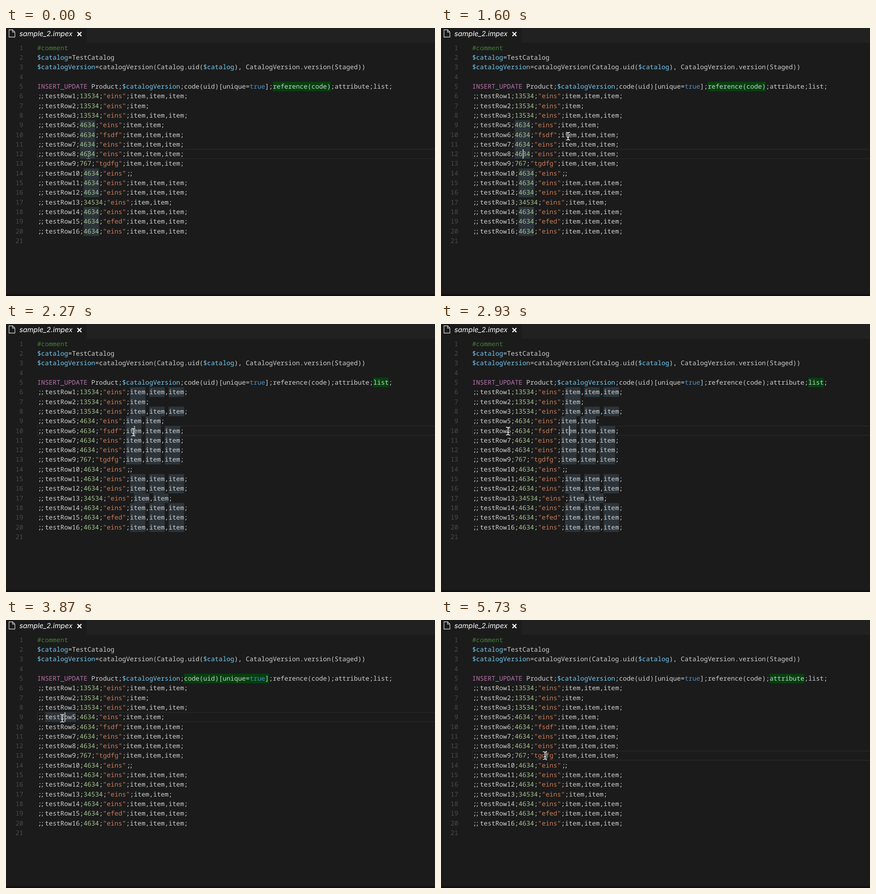
These frames come from a looping animation (947x592 px, 5.79 s). An HTML page:

```html
<!DOCTYPE html>
<html lang="en">
<head>
<meta charset="utf-8">
<title>Editor column highlight</title>
<style>
  html, body { margin: 0; width: 100%; height: 100%; overflow: hidden; background: #1b1b1b; }
  svg { display: block; width: 947px; height: 592px; }
  text { text-rendering: geometricPrecision; white-space: pre; }
  .code { font: 14.208px "Noto Sans Mono", "DejaVu Sans Mono", monospace; }
  .tab { font: italic 15.4px Inter, "Open Sans", sans-serif; fill: #fff; }
</style>
</head>
<body>
<svg id="stage" viewBox="0 0 947 592" xmlns="http://www.w3.org/2000/svg">
  <rect width="947" height="592" fill="#1b1b1b"/>
  <rect x="178" width="769" height="33" fill="#212121"/>
  <rect y="588" width="947" height="4" fill="#130d13"/>
  <path d="M6.6 4h8l5 5v11h-13zM14.4 4v5.2h5.2" fill="none" stroke="#cfcfcf" stroke-width="1.3"/>
  <text class="tab" x="29.5" y="18.3">sample_2.impex</text>
  <path d="M157.7 9l8.8 8.8m0-8.8l-8.8 8.8" stroke="#fff" stroke-width="2.4"/>
  <rect id="line" x="69.5" width="900" height="20.3" fill="none" stroke="#282828" stroke-width="1.4"/>
  <g id="marks"></g>
  <g id="code" class="code"></g>
  <rect id="caret" width="2" height="21.3" fill="#b4b5b3"/>
  <g id="mouse" fill="none" stroke-linecap="round">
    <path d="M-4 -8.5Q0 -8.5 0 -6Q0 -8.5 4 -8.5M0 -6V6M-4 8.5Q0 8.5 0 6Q0 8.5 4 8.5M-2 2.5H2" stroke="#1b1b1b" stroke-width="3.2"/>
    <path d="M-4 -8.5Q0 -8.5 0 -6Q0 -8.5 4 -8.5M0 -6V6M-4 8.5Q0 8.5 0 6Q0 8.5 4 8.5M-2 2.5H2" stroke="#f2f2f2" stroke-width="1.6"/>
  </g>
</svg>
<script>
const LOOP = 5790, LEFT = 69, TOP = 33.3, CHAR = 8.525, ROW = 21.3, BASELINE = 15.52;
const byId = id => document.getElementById(id);
const colX = col => LEFT + col * CHAR;
const rowY = line => TOP + (line - 1) * ROW;

const source = `#comment
$catalog=TestCatalog
$catalogVersion=catalogVersion(Catalog.uid($catalog), CatalogVersion.version(Staged))

INSERT_UPDATE Product;$catalogVersion;code(uid)[unique=true];reference(code);attribute;list;
;;testRow1;13534;"eins";item,item,item;
;;testRow2;13534;"eins";item;
;;testRow3;13534;"eins";item,item,item;
;;testRow5;4634;"eins";item,item;
;;testRow6;4634;"fsdf";item,item,item;
;;testRow7;4634;"eins";item,item,item;
;;testRow8;4634;"eins";item,item,item;
;;testRow9;767;"tgdfg";item,item,item;
;;testRow10;4634;"eins";;
;;testRow11;4634;"eins";item,item,item;
;;testRow12;4634;"eins";item,item,item;
;;testRow13;34534;"eins";item,item;
;;testRow14;4634;"eins";item,item,item;
;;testRow15;4634;"efed";item,item,item;
;;testRow16;4634;"eins";item,item,item;
`.split("\n");

// Each capture group of the tokenizer takes the colour at the same index.
const TOKEN = /(#.*)|(\$\w+)|(INSERT_UPDATE)|("\w+")|(\btrue\b)|((?<=;)\d+)|(;;)|\w+|[^\w\s]/g;
const COLORS = ["#457f38", "#73c9f0", "#b873ad", "#cb7d5a", "#4f8fc6", "#a6c592"];
const PLAIN = "#cfcfcf";

function add(parent, tag, attrs, text) {
  const node = document.createElementNS("http://www.w3.org/2000/svg", tag);
  for (const key in attrs) node.setAttribute(key, attrs[key]);
  if (text) node.textContent = text;
  return parent.appendChild(node);
}

function addText(x, line, fill, text, anchor = "start") {
  add(byId("code"), "text", { x, y: rowY(line) + BASELINE, fill, "text-anchor": anchor }, text);
}

source.forEach((row, i) => {
  addText(38, i + 1, "#4a4a4a", String(i + 1), "end");
  for (const match of row.matchAll(TOKEN)) {
    const x = colX(match.index);
    if (match[7]) {
      // Paired semicolons sit closer together, like a ligature.
      addText(x + 1.3, i + 1, PLAIN, ";");
      addText(x + CHAR - 1.6, i + 1, PLAIN, ";");
    } else {
      const kind = match.slice(1, 7).findIndex(Boolean);
      addText(x, i + 1, COLORS[kind] || PLAIN, match[0]);
    }
  }
});

function markGroup(word, fill, from) {
  const group = add(byId("marks"), "g", { fill });
  source.forEach((row, i) => {
    if (i + 1 < from) return;
    let col = -1;
    while ((col = row.indexOf(word, col + 1)) >= 0) {
      if (/\w/.test(row[col - 1] || "")) continue;
      add(group, "rect", { x: colX(col), y: rowY(i + 1), width: word.length * CHAR, height: ROW });
    }
  });
  return group;
}

// click: caret lands; head / words: when the column title and equal words light up
const scenes = [
  { click: -600, line: 12, col: 13, head: 0, title: "reference(code)", words: 0, word: "4634" },
  { click: 1930, line: 10, col: 25, head: 2000, title: "list", words: 2270, word: "item" },
  { click: 3530, line: 9, col: 7, head: 3600, title: "code(uid)[unique=true]", words: 3870, word: "testRow5" },
  { click: 5530, line: 13, col: 19, head: 5600, title: "attribute", words: LOOP, word: "" }
];
for (const s of scenes) {
  s.headMark = markGroup(s.title, "#04400f", 5);
  if (s.word) s.wordMark = markGroup(s.word, "#2c343a", 6);
}

const easeIn = p => p * p * (1.6 - 0.6 * p);
const easeOut = p => 1 - (1 - p) ** 2;
const easeBoth = p => p * p * (3 - 2 * p);

// time, x, y, easing into the stop
const path = [
  [0, 182, 280.5], [630, 182, 280.5], [1270, 280, 239, easeBoth],
  [2000, 281, 239], [2620, 281, 239], [2930, 148.5, 237, easeIn], [3330, 124, 217, easeOut],
  [4480, 124, 217], [4800, 194, 280, easeIn], [5130, 229.5, 299.5, easeOut], [LOOP, 229.5, 299.5]
];

function mouseAt(t) {
  const i = Math.max(1, path.findIndex(stop => t <= stop[0]));
  const [t0, x0, y0] = path[i - 1];
  const [t1, x1, y1, ease = p => p] = path[i];
  const p = ease((t - t0) / (t1 - t0));
  return [x0 + (x1 - x0) * p, y0 + (y1 - y0) * p];
}

const show = (node, on) => node.setAttribute("visibility", on ? "visible" : "hidden");
const latest = (key, t) => scenes.filter(s => s[key] <= t).pop();

function draw(t) {
  const scene = latest("click", t);
  const head = latest("head", t);
  for (const s of scenes) {
    show(s.headMark, s === head);
    if (s.wordMark) show(s.wordMark, s === scene && t >= s.words);
  }
  byId("line").setAttribute("y", rowY(scene.line) + 0.5);
  const caret = byId("caret");
  caret.setAttribute("x", colX(scene.col) + 0.5);
  caret.setAttribute("y", rowY(scene.line));
  show(caret, (t - scene.click) % 1000 < 500);

  // The pointer advances at 15 steps a second and is faint until it first moves.
  const step = Math.floor((t + 4) * 0.015) / 0.015;
  const mouse = byId("mouse");
  mouse.setAttribute("transform", `translate(${mouseAt(step)})`);
  mouse.setAttribute("opacity", t < 670 ? 0.35 : 1);
}

const start = performance.now();
function tick() {
  draw((performance.now() - start) % LOOP);
  requestAnimationFrame(tick);
}
draw(0);
requestAnimationFrame(tick);
</script>
</body>
</html>
```
